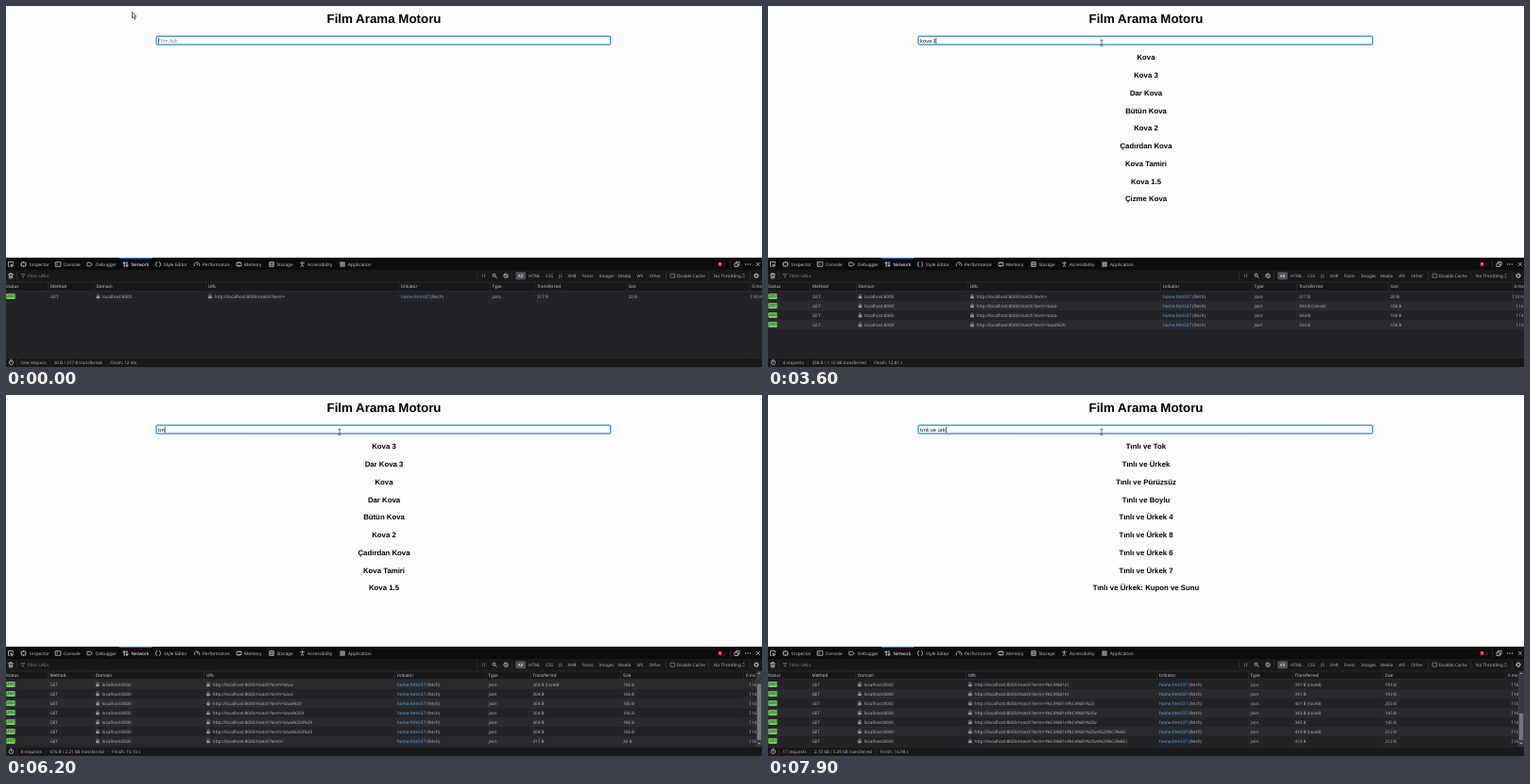
An HTML page for the animation above (8000 ms loop, 800 by 383 pixels).

```html
<!DOCTYPE html>
<html lang="tr">
<head>
<meta charset="utf-8">
<title>Film Arama Motoru</title>
<style>
  html, body { margin: 0; width: 100%; height: 100%; overflow: hidden; background: #fefdfe; }
  svg { display: block; width: 100%; height: 100%; }
  text { white-space: pre; text-rendering: geometricPrecision; font: 4.58px "Noto Sans", "Open Sans", sans-serif; }
  .page { font: bold 7.8px "Liberation Sans", Arial, sans-serif; text-anchor: middle; }
  .title { font-size: 13.33px; }
  .typed { font-size: 5.5px; }
  .tab { font-size: 4.7px; }
</style>
</head>
<body>
<svg id="stage" viewBox="0 0 800 383"></svg>
<script>
const LOOP = 8000, STEP = 100;
const stage = document.getElementById('stage');

// Request log: time, term, size in bytes, raced, finish in seconds
const T = 't%C4%B1', FULL = T + 'nl%C4%B1%20';
const requests = [
  [0, '', 20, 0, 0.012], [2700, 'kova', 106, 1, 11.91], [2900, 'kova', 106, 0, 12.13],
  [3400, 'kova%20', 106, 0, 12.81], [3700, 'kova%203', 106, 0, 13.1],
  [4800, 'kova%203%20', 106, 0, 14.01], [4900, 'kova%203%20', 106, 0, 14.15],
  [5900, '', 20, 0, 15.15], [6300, T, 20, 1, 15.62], [6400, T + 'n', 154, 1, 15.73],
  [6500, T + 'nl', 193, 1, 15.84], [6600, T + 'nl', 193, 0, 15.96], [6700, FULL, 203, 1, 16.1],
  [6900, FULL + 'v', 145, 1, 16.33], [7200, FULL + 'v', 145, 0, 16.55],
  [7500, FULL + 've%20%C3%BC', 212, 1, 16.8], [7700, FULL + 've%20%C3%BCr', 212, 0, 16.98]
].map(([time, term, size, raced, finish]) =>
  ({ time, term, size, raced, finish, sent: size + (size > 99 ? 198 : 197) }));

const typing = [
  [0, ''], [2200, 'k'], [2300, 'ko'], [2500, 'kov'], [2600, 'kova'], [3300, 'kova '], [3500, 'kova 3'],
  [4800, 'kova 3 '], [5200, 'kova 3'], [5300, 'kova '], [5400, 'kova'], [5500, 'kov'], [5600, 'ko'],
  [5700, 'k'], [5800, ''], [6000, 't'], [6100, 'tı'], [6200, 'tın'], [6400, 'tınl'], [6500, 'tınlı'],
  [6700, 'tınlı '], [6900, 'tınlı v'], [7100, 'tınlı ve'], [7300, 'tınlı ve '], [7400, 'tınlı ve ü'],
  [7600, 'tınlı ve ür'], [7800, 'tınlı ve ürk']
];

const pair = s => s.split(',').map(w => 'Tınlı ve ' + w);
const results = [
  [0, []],
  [2800, ['Kova', 'Kova 3', 'Dar Kova', 'Bütün Kova', 'Kova 2', 'Çadırdan Kova', 'Kova Tamiri', 'Kova 1.5', 'Çizme Kova']],
  [3800, ['Kova 3', 'Dar Kova 3', 'Kova', 'Dar Kova', 'Bütün Kova', 'Kova 2', 'Çadırdan Kova', 'Kova Tamiri', 'Kova 1.5']],
  [6600, ['Tınlı Testici', ...pair('Tok,Ürkek,Pürüzsüz,Boylu,Ürkek 4,Ürkek 8,Ürkek 6,Ürkek 7')]],
  [7000, ['Y', 'Tınlı Testici', 'Kumlu Yol V', 'Atıl v 305', 'P/K/E', ...pair('Tok,Ürkek,Pürüzsüz,Boylu')]],
  [7600, pair('Tok,Ürkek,Pürüzsüz,Boylu,Ürkek 4,Ürkek 8,Ürkek 6,Ürkek 7,Ürkek: Kupon ve Sunu')]
];

// Mouse path: time, x, y
const mouse = [
  [0, 133.5, 6.5], [400, 443, 301], [800, 180, 43], [900, 180, 43], [1000, 179, 39], [1100, 183, 42],
  [1400, 183, 42], [1800, 356.5, 42], [1900, 353, 39.2], [LOOP, 353, 39.2]
];

const latest = (list, t) => list.filter(e => e[0] <= t).pop()[1];
const bytes = n => n < 1024 ? n + ' B' : (n / 1024).toFixed(2) + ' kB';
const sum = (list, key) => list.reduce((n, r) => n + r[key], 0);

const rect = (x, y, w, h, fill, more = '') =>
  `<rect x="${x}" y="${y}" width="${w}" height="${h}" fill="${fill}" ${more}/>`;
const text = (x, y, s, fill = '#b4b4b8', cls = '') =>
  `<text x="${x}" y="${y}" fill="${fill}" class="${cls}">${s}</text>`;
const icon = (x, y, d, color = '#c4c4c8', w = 0.8) =>
  `<path transform="translate(${x} ${y})" d="${d}" fill="none" stroke="${color}" stroke-width="${w}"/>`;
const vline = (x, y, h, color = '#3c3c41') => rect(x, y, 0.5, h, color);
const lock = (x, y) => icon(x, y, 'M-1.1 0v-1.1a1.1 1.1 0 0 1 2.2 0V0', '#9a9a9e', 0.6) +
  rect(x - 1.8, y - 0.3, 3.6, 2.6, '#9a9a9e', 'rx=".4"');

const BOX = 'M-2.3-2h4.6v4h-4.6z', RING = 'M-2.2 0a2.2 2.2 0 1 0 4.4 0a2.2 2.2 0 1 0-4.4 0';
const tabs = [
  ['Inspector', 18.5, 25, BOX + 'M-3 0h1.5M1.5 0H3M0-2.8v1.5M0 1.3v1.5'],
  ['Console', 55, 61, 'M-2.8-2.3h5.6v4.6h-5.6zM-1.5-1l1.2 1-1.2 1'],
  ['Debugger', 88.5, 95, 'M-2.7-1.8h3.4l2 1.8-2 1.8h-3.4z'],
  ['Network', 126.5, 132.5, 'M-1.4 2.8v-5M-2.9-.8l1.5-1.6L.1-.8M1.5-2.8v5M0 .8l1.5 1.6L3 .8'],
  ['Style Editor', 161, 167, 'M-1-2.5q-1.2 0-1.2 1.2T-3 0q.8 0 .8 1.3t1.2 1.2M1-2.5q1.2 0 1.2 1.2T3 0q-.8 0-.8 1.3T1 2.5'],
  ['Performance', 202, 208, 'M-2.5 2a2.8 2.8 0 1 1 5 0M0 1l1.2-2'],
  ['Memory', 246.5, 252, 'M-2.5-1.5h5v3h-5zM-1.5-2.6v1M0-2.6v1M1.5-2.6v1M-1.5 1.6v1M0 1.6v1M1.5 1.6v1'],
  ['Storage', 281, 286.5, 'M-2.2-2.4h4.4v4.8h-4.4zM-2.2-.8h4.4M-2.2.8h4.4'],
  ['Accessibility', 313.5, 319, 'M-2.4-1.2h4.8M0-1.2v1.6l-1.4 2.3M0 .4l1.4 2.3M-.5-2.6h1'],
  ['Application', 356, 362, 'M-2.2-2.2h1.7v1.7h-1.7zM.6-2.2h1.7v1.7H.6zM-2.2.6h1.7v1.7h-1.7zM.6.6h1.7v1.7H.6z']
];
const filters = { HTML: 553, CSS: 571, JS: 585, XHR: 594.5, Fonts: 609.5, Images: 627.5, Media: 648, WS: 667.5, Other: 680.5 };

// Parts that never change
const frame =
  rect(0, 0, 800, 383, '#fefdfe') + text(400, 18.1, 'Film Arama Motoru', '#000', 'page title') +
  rect(158.2, 31.2, 482.4, 10.6, '#9ccbf5', 'rx="1.8"') +
  rect(159.2, 32.2, 480.4, 8.6, '#fff', 'rx="1" stroke="#1f78c8" stroke-width=".9"') +
  rect(0, 267, 800, 116, '#232327') + rect(0, 267, 800, 13, '#0c0c0d') +
  rect(0, 280, 800, 13, '#18181a') + rect(120, 267, 34.5, 1, '#0a84ff') +
  icon(5, 274, 'M-.5 2.3h-2v-4.8h5v2M0 0l3 1.2-1.4.5-.5 1.4z') +
  tabs.map(([name, ix, tx, d]) => {
    const color = name == 'Network' ? '#fff' : '#c4c4c8';
    return icon(ix, 274, d, color) + text(tx, 275.8, name, color, 'tab');
  }).join('') +
  icon(773.5, 274, 'M-2.5-1h3.4v3.5h-3.4zM-1-1v-1.6h3.6v3.7H1') + vline(766, 269.5, 9) +
  [782.5, 785, 787.5].map(x => rect(x - 0.6, 273.4, 1.2, 1.2, '#c4c4c8')).join('') +
  icon(795.8, 274, 'M-2-2l4 4M2-2l-4 4') +
  icon(5, 286.3, 'M-2.5-1.8h5M-.9-1.8v-.9H.9v.9M-1.9-1.8l.3 4.4h3.2l.3-4.4M-.6-.4v2M.6-.4v2') +
  [11.5, 498.5, 535.5, 698, 743, 787].map(x => vline(x, 282, 9)).join('') +
  icon(18, 286.2, 'M-1.9-1.7h3.8L.5.2v1.9l-1-.6V.2z', '#85858a', 0.6) + text(22.5, 287.8, 'Filter URLs', '#85858a') +
  icon(505.5, 286.2, 'M-1.2-1.9v3.8M1.2-1.9v3.8', '#a4a4a8', 0.6) +
  icon(517, 286.2, 'M-2-.6a1.5 1.5 0 1 0 3 0a1.5 1.5 0 1 0-3 0M.6.6l1.9 1.9', '#d7d7db') +
  icon(529, 286.2, RING + 'M-1.5-1.5l3 3', '#d7d7db') +
  rect(539.3, 282.2, 10.6, 8, '#515156', 'rx="1"') + text(541.8, 287.8, 'All', '#fff') +
  Object.entries(filters).map(([s, x]) => text(x, 287.8, s)).join('') +
  icon(705.4, 286.2, BOX, '#a4a4a8', 0.6) + text(709.7, 287.8, 'Disable Cache') +
  text(749, 287.8, 'No Throttling') + icon(780.5, 286.2, 'M-.9-.7L0-1.9l.9 1.2M-.9.7L0 1.9.9.7', '#b4b4b8', 0.6) +
  icon(794, 286.2, 'M-1.7 0a1.7 1.7 0 1 0 3.4 0a1.7 1.7 0 1 0-3.4 0M0-2.9v1.2M0 2.9V1.7M-2.9 0h1.2M2.9 0H1.7M-2-2l.8.8M2 2l-.8-.8M-2 2l.8-.8M2-2l-.8.8', '#d7d7db');

function table(done) {
  const n = done.length, scrolled = n > 7;
  const cols = scrolled ? [0, 46.5, 95, 212, 414, 510.5, 557.5, 653, 783] : [0, 47, 95.5, 214, 418, 514.5, 562, 658.5, 789.5];
  const top = scrolled ? 302 : 303;
  let out = '', lines = '';
  done.forEach((r, i) => {
    const y = top + 10 * (scrolled ? i - n + 7 : i);
    if (y < top) return;
    const b = y + 6.5, [, method, domain, url, init, type, sent, size] = cols;
    const tick = i == 0 ? 788 : scrolled ? 787 : 792.5;
    const wait = i == 0 ? '10 ms' : 14 + (i + 1) % 3;
    if (i % 2) out += rect(0, y, 800, 10, '#2a2a2e');
    out += rect(0.3, y + 2.1, 9.4, 5.8, '#74ce62', 'rx="1"') + text(1, b - 0.1, '200', '#17321a') +
      text(method, b, 'GET') + lock(domain + 2, y + 5) + text(domain + 6.7, b, 'localhost:8000') +
      lock(url + 2, y + 5) + text(url + 6.6, b, 'http://localhost:8000/match?term=' + r.term) +
      text(init, b, '<tspan fill="#62b2f5">home.html:37</tspan> (fetch)') + text(type, b, 'json') +
      text(sent, b, r.sent + ' B' + (r.raced ? ' (raced)' : '')) + text(size, b, r.size + ' B') +
      rect(tick, y + 3, 0.6, 4.3, '#8a8a90') + text(tick + 1.8, b, wait);
  });
  out += rect(0, 293, 800, top - 293, '#18181a') + rect(0, top - 0.5, 800, 0.5, '#38383d') + rect(0, 292.7, 800, 0.5, '#38383d');
  'Status,Method,Domain,URL,Initiator,Type,Transferred,Size,0 ms'.split(',').forEach((s, i) => {
    out += text(cols[i], 299.2, s, '#d0d0d4');
    if (!i) return;
    out += vline(cols[i] - 2.5, 293, top - 293, '#343439');
    lines += vline(cols[i] - 2.5, top, 373 - top, '#29292d');
  });
  if (scrolled) {
    const h = 68 * 7 / n;
    out += rect(794, 293, 6, 80, '#38383d') + rect(794.8, 366 - h, 4.4, h, '#76767b') +
      icon(797, 295.5, 'M-1.3.7L0-.7 1.3.7', '#d7d7db') + icon(797, 369.5, 'M-1.3-.7L0 .7l1.3-1.4', '#d7d7db');
  }
  return lines + out;
}

function footer(done) {
  const n = done.length, end = done[n - 1].finish;
  const parts = [
    n == 1 ? 'One request' : n + ' requests',
    `${bytes(sum(done, 'size'))} / ${bytes(sum(done, 'sent'))} transferred`,
    'Finish: ' + (end < 1 ? end * 1000 + ' ms' : end.toFixed(2) + ' s')
  ];
  const gap = '<tspan dx="3" fill="#4a4a4f">|</tspan>';
  return rect(0, 373, 800, 10, '#18181a') + rect(0, 373, 800, 0.5, '#38383d') + vline(11, 374, 8) +
    icon(5.5, 378.3, RING + 'M0 0v-1.3M-.8-3.1H.8') +
    text(15.5, 379.6, parts.map((s, i) => i ? `${gap}<tspan dx="3">${s}</tspan>` : s).join(''));
}

function pointer(t) {
  const i = Math.max(1, mouse.findIndex(p => p[0] >= t));
  const [t0, x0, y0] = mouse[i - 1], [t1, x1, y1] = mouse[i];
  const k = (t - t0) / (t1 - t0), x = x0 + (x1 - x0) * k, y = y0 + (y1 - y0) * k;
  return t < 1000
    ? `<path transform="translate(${x} ${y})" d="M0 0v6.3l1.5-1.3 1.1 2.5 1-.5-1.1-2.4h2z" fill="#fff" stroke="#222" stroke-width=".7"/>`
    : icon(x, y, 'M-1.6-3h3.2M0-3v6M-1.6 3h3.2', '#333', 0.7);
}

function draw(t) {
  const done = requests.filter(r => r.time <= t), typed = latest(typing, t);
  const errors = done.filter(r => r.size == 20).length;
  const blink = t >= 3100 && t < 3300 || t >= 4300 && t < 4800;
  stage.innerHTML = frame + table(done) + footer(done) +
    '<circle cx="755.6" cy="274" r="2.3" fill="#d7264f"/>' + rect(755.2, 272.6, 0.8, 1.7, '#fff') +
    text(759.2, 275.7, errors, '#d7264f') +
    latest(results, t).map((s, i) => text(400, 57.4 + 18.75 * i, s, '#000', 'page')).join('') +
    (typed ? '' : text(161, 38.7, 'Film Adı', '#85858a', 'typed')) +
    `<text id="query" x="161" y="38.7" class="typed">${typed}</text>` +
    (blink ? '' : rect(161, 33.6, 0.6, 6.3, '#000', 'id="caret"')) + pointer(t);
  const caret = document.getElementById('caret');
  if (caret && typed) caret.setAttribute('x', 161 + document.getElementById('query').getComputedTextLength());
}

let shown = -1;
function tick(now) {
  const t = Math.floor(now % LOOP / STEP) * STEP;
  if (t != shown) draw(shown = t);
  requestAnimationFrame(tick);
}
draw(0);
requestAnimationFrame(tick);
</script>
</body>
</html>
```
